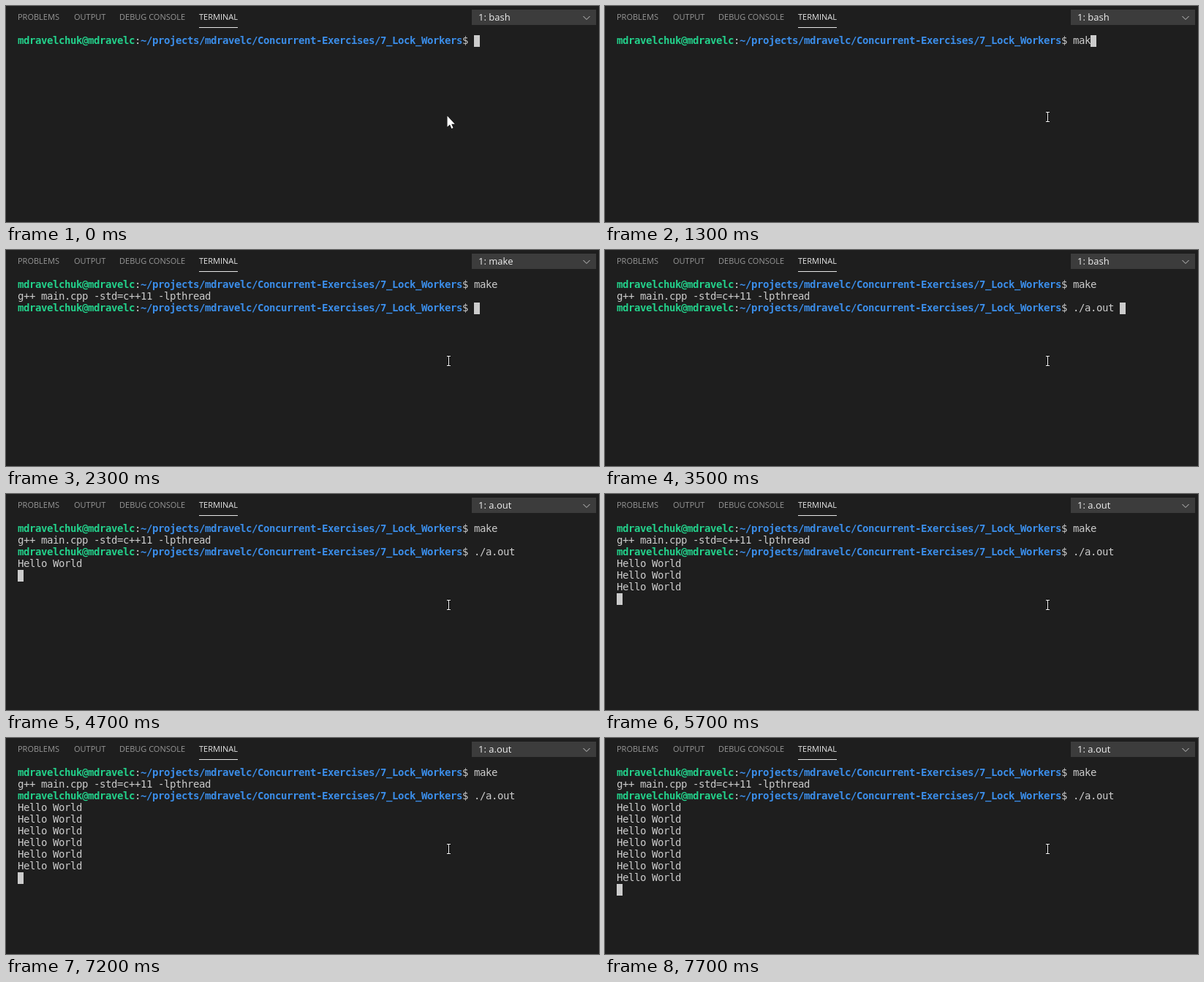
Animation of 811 by 296 pixels, one loop 8000 ms. Source, as an HTML page with a canvas:

```html
<!DOCTYPE html>
<html lang="en">
<head>
<meta charset="utf-8">
<title>Terminal</title>
<style>
html, body { margin: 0; height: 100%; overflow: hidden; background: #1e1e1e; }
canvas { display: block; }
</style>
</head>
<body>
<canvas id="stage" width="811" height="296"></canvas>
<script>
const ctx = document.getElementById('stage').getContext('2d');
const LOOP = 8000, CELL_W = 8, CELL_H = 16, LEFT = 16, TOP = 40;
const GRAY = '#cccccc', GREEN = '#23d18b', BLUE = '#3b8eea';
const UI = '"Open Sans", "Noto Sans", sans-serif';
const MONO = '"DejaVu Sans Mono", monospace';
const USER = 'mdravelchuk@mdravelc';
const PATH = '~/projects/mdravelc/Concurrent-Exercises/7_Lock_Workers';
const PROMPT_COLS = USER.length + PATH.length + 3;

// Each entry is [start time, value]; the latest one that has started applies.
const MAKE = [[0, ''], [700, 'ma'], [1300, 'mak'], [1800, 'make']];
const RUN = [[0, ''], [3000, '.'], [3200, './'], [3300, './a'], [3500, './a.out ']];
const LABEL = [[0, 'bash'], [1900, 'make'], [2500, 'bash'], [4300, 'a.out']];
const at = (steps, t) => steps.filter(([start]) => start <= t).pop()[1];

function label(text, x, y, size, color) {
  ctx.font = `${size}px ${UI}`;
  ctx.fillStyle = color;
  ctx.fillText(text, x, y);
}

function box(x, y, w, h, color) {
  ctx.fillStyle = color;
  ctx.fillRect(x, y, w, h);
}

function line(points, color, width = 1) {
  ctx.beginPath();
  points.forEach(([x, y]) => ctx.lineTo(x, y));
  ctx.strokeStyle = color;
  ctx.lineWidth = width;
  ctx.stroke();
}

// Writes one character per terminal cell and returns the next column.
function write(text, col, row, color = GRAY, weight = 'normal') {
  ctx.font = `${weight} 14px ${MONO}`;
  ctx.fillStyle = color;
  for (const char of text) {
    ctx.fillText(char, LEFT + col++ * CELL_W, TOP + row * CELL_H + 12);
  }
  return col;
}

function prompt(row, command) {
  let col = write(USER, 0, row, GREEN, 'bold');
  col = write(':', col, row);
  col = write(PATH, col, row, BLUE, 'bold');
  write('$ ' + command, col, row);
}

function header(t) {
  const tabs = [['PROBLEMS', 16], ['OUTPUT', 93], ['DEBUG CONSOLE', 155], ['TERMINAL', 264]];
  for (const [name, x] of tabs) {
    label(name, x, 19, 11, name === 'TERMINAL' ? '#e7e7e7' : '#979797');
  }
  box(264, 29, 53, 1, '#e7e7e7');
  box(637, 5, 170, 21, '#3c3c3c');
  label('1: ' + at(LABEL, t), 646, 20, 13, '#f0f0f0');
  line([[789.5, 14], [794, 18.5], [798.5, 14]], '#c5c5c5');
}

function terminal(t) {
  const make = at(MAKE, t), run = at(RUN, t);
  let cursor = [PROMPT_COLS + make.length, 0];
  prompt(0, make);
  if (t >= 1900) {
    write('g++ main.cpp -std=c++11 -lpthread', 0, 1);
    cursor = [0, 2];
  }
  if (t >= 2300) {
    prompt(2, run);
    cursor = [PROMPT_COLS + run.length, 2];
  }
  if (t >= 4200) {
    const count = Math.floor((t - 4200) / 500);
    for (let i = 0; i < count; i++) write('Hello World', 0, 3 + i);
    cursor = [0, 3 + count];
  }
  box(LEFT + cursor[0] * CELL_W, TOP + cursor[1] * CELL_H, CELL_W, CELL_H, GRAY);
}

function pointer(t) {
  if (t < 400) {
    const arrow = [[603.5, 150.5], [603.5, 165.8], [607, 162.5], [609.4, 168],
      [611.6, 167], [609.3, 161.7], [613.8, 161.7], [603.5, 150.5]];
    line(arrow, '#000');
    ctx.fillStyle = '#fff';
    ctx.fill();
  } else {
    for (const [color, width] of [['#000', 2.4], ['#fff', 1]]) {
      line([[605.5, 145], [605.5, 159]], color, width);
      line([[603, 145.5], [608, 145.5]], color, width);
      line([[603, 158.5], [608, 158.5]], color, width);
    }
  }
}

function draw(now) {
  const t = now % LOOP;
  box(0, 0, 811, 296, '#1e1e1e');
  header(t);
  terminal(t);
  pointer(t);
  requestAnimationFrame(draw);
}
requestAnimationFrame(draw);
</script>
</body>
</html>
```
